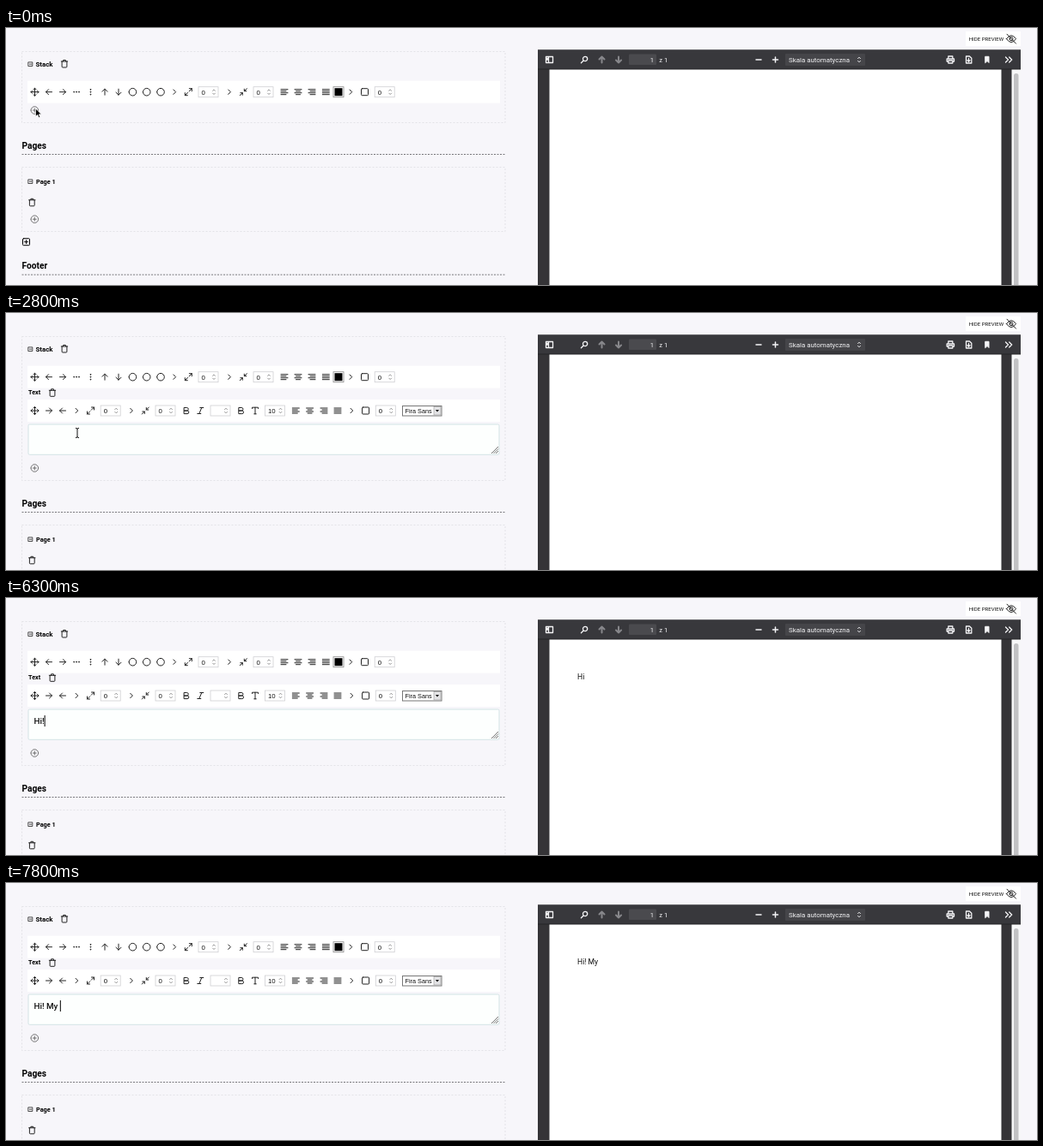
Animation of 1200x300 px, one loop 8 s. Source, as an HTML page:

```html
<!DOCTYPE html>
<html lang="en">
<head>
<meta charset="utf-8">
<title>Document editor with preview</title>
<style>
  html, body { margin: 0; height: 100%; overflow: hidden; background: #f7f6fa; }
  svg { display: block; width: 100vw; height: 100vh; }
  text { font-family: Roboto, "Open Sans", sans-serif; white-space: pre; fill: #111; }
  .bold { font-weight: 700; fill: #000; }
  .arial { font-family: "Liberation Sans", Arial, sans-serif; }
  .icon { fill: none; stroke: #222; stroke-width: 1; stroke-linecap: round; stroke-linejoin: round; }
  .panel { fill: none; stroke: #e3e2e7; stroke-width: 1; stroke-dasharray: 2 2; }
  .rule { stroke: #77767a; stroke-width: 1; stroke-dasharray: 2 1.5; }
  .light { stroke: #f4f4f6; }
  .dim { stroke: #87878b; }
</style>
</head>
<body>
<svg id="stage" viewBox="0 0 1200 300"></svg>
<script>
const LOOP = 8000, STEP = 100;

// Icon outlines, each centred on 0,0
const shapes = {
  move: 'M-4.5 0H4.5M0-4.5V4.5M-1.5-3L0-4.5L1.5-3M-1.5 3L0 4.5L1.5 3M-3-1.5L-4.5 0L-3 1.5M3-1.5L4.5 0L3 1.5',
  left: 'M3.5 0H-3.5M-.5-3L-3.5 0L-.5 3',
  right: 'M-3.5 0H3.5M.5-3L3.5 0L.5 3',
  up: 'M0 3.5V-3.5M-3-.5L0-3.5L3-.5',
  down: 'M0-3.5V3.5M-3 .5L0 3.5L3 .5',
  dotsX: 'M-3.2-.3h.6v.6h-.6zM-.3-.3h.6v.6h-.6zM2.6-.3h.6v.6h-.6z',
  dotsY: 'M-.3-3.2h.6v.6h-.6zM-.3-.3h.6v.6h-.6zM-.3 2.6h.6v.6h-.6z',
  circle: 'M-4.3 0a4.3 4.3 0 1 0 8.6 0a4.3 4.3 0 1 0-8.6 0',
  chevron: 'M-1.3-2.7L1.4 0L-1.3 2.7',
  expand: 'M-4 4L-.8.8M.8-.8L4-4M1-4H4V-1M-4 1V4H-1',
  collapse: 'M-4 4L-1 1M1-1L4-4M-3.5 1H-1V3.5M1-3.5V-1H3.5',
  alignL: 'M-4-3H4M-4-1H2M-4 1H4M-4 3H2',
  alignC: 'M-4-3H4M-2.5-1H2.5M-4 1H4M-2.5 3H2.5',
  alignR: 'M-4-3H4M-2-1H4M-4 1H4M-2 3H4',
  justify: 'M-4-3H4M-4-1H4M-4 1H4M-4 3H4',
  square: 'M-3-4H3Q4-4 4-3V3Q4 4 3 4H-3Q-4 4-4 3V-3Q-4-4-3-4Z',
  bold: 'M-2.5-3.5H.5a1.75 1.75 0 0 1 0 3.5H-2.5ZM-2.5 0H1a1.8 1.8 0 0 1 0 3.6H-2.5Z',
  italic: 'M-.5-3.5H3.5M-3.5 3.5H.5M1.5-3.5L-1.5 3.5',
  type: 'M-3.5-2.5V-3.8H3.5V-2.5M0-3.8V3.8M-1.2 3.8H1.2',
  trash: 'M-3.7-2.7H3.7M-1.4-2.8V-4.2H1.4V-2.8M-2.9-2.7V3.4Q-2.9 4.3-2 4.3H2Q2.9 4.3 2.9 3.4V-2.7',
  plus: 'M-2 0H2M0-2V2',
  minus: 'M-2 0H2',
  toggle: 'M-2.3-2.3H2.3V2.3H-2.3ZM-1.2 0H1.2',
  eyeOff: 'M-5.5 0Q0-8 5.5 0Q0 8-5.5 0ZM-2 0a2 2 0 1 0 4 0a2 2 0 1 0-4 0M-5-5.5L5.5 5.5',
  sidebar: 'M-4-3.5H4V3.5H-4ZM-1-3.5V3.5M-3-1.5H-2M-3 0H-2',
  search: 'M-1.5-1a2.6 2.6 0 1 0 5.2 0a2.6 2.6 0 1 0-5.2 0M-.8 1L-3.6 3.8',
  print: 'M-2.5-1V-4H2.5V-1M-2.5 2H-4.2V-1H4.2V2H2.5M-2.5 1H2.5V4H-2.5Z',
  save: 'M-3-4H1L3.3-1.7V4H-3ZM0-1.5V2M-1.5 .8L0 2.3L1.5 .8',
  bookmark: 'M-2-3.7H2V3.5L0 1.5L-2 3.5Z',
  more: 'M-3.5-3L-.5 0L-3.5 3M.7-3L3.7 0L.7 3',
  spin: 'M-1.4-1.4L0-2.8L1.4-1.4M-1.4 1.4L0 2.8L1.4 1.4'
};

const icon = (name, x, y, style = '') =>
  `<path class="icon" d="${shapes[name]}" transform="translate(${x} ${y})" style="${style}"/>`;
const lightIcon = (name, x, cls = 'light', style = 'stroke-width:1.3') =>
  `<path class="icon ${cls}" d="${shapes[name]}" transform="translate(${x} 37)" style="${style}"/>`;
const label = (str, x, y, size, attrs = '') =>
  `<text x="${x}" y="${y}" font-size="${size}" ${attrs}>${str}</text>`;
const box = (x, y, w, h, fill, attrs = '') =>
  `<rect x="${x}" y="${y}" width="${w}" height="${h}" fill="${fill}" ${attrs}/>`;
const field = (x, y, value) =>
  box(x + .5, y - 6, 23, 12, '#fff', 'stroke="#cfcfd3" stroke-width=".8"') +
  label(value, x + 4, y + 2.8, 7.8, 'class="arial"') +
  icon('spin', x + 18.5, y, 'stroke:#777;stroke-width:.8');
const ringed = (name, x, y, id = '') =>
  `<g ${id}>${icon('circle', x, y, 'stroke:#555;stroke-width:.8')}${icon(name, x, y, 'stroke:#555;stroke-width:.8')}</g>`;
const rule = y => `<path class="rule" d="M18.5 ${y}H581"/>`;
// A row of [icon name, x] or [number field value, x, true]
const toolbar = (y, items) => box(25, y - 13, 550, 26, '#fff') +
  items.map(([name, x, isField]) => isField ? field(x, y, name) : icon(name, x, y)).join('');
const button = (str, x, y, w, attrs = '') =>
  `<g ${attrs}>${box(x + .5, y + .5, w - 1, 15, '#fff', 'rx="1.2" stroke="#111"')}` +
  label(str, x + w / 2, y + 10.2, 6.5, 'text-anchor="middle" font-weight="500"') + '</g>';

const stackBar = toolbar(74.7, [
  ['move', 33.5], ['left', 50], ['right', 66], ['dotsX', 82.3], ['dotsY', 98.7], ['up', 115], ['down', 131],
  ['circle', 147.4], ['circle', 163.7], ['circle', 180], ['chevron', 196.2], ['expand', 212.3], ['0', 223.5, true],
  ['chevron', 260], ['collapse', 276.3], ['0', 287.5, true], ['alignL', 324], ['alignC', 340], ['alignR', 356],
  ['justify', 372.3], ['chevron', 401.3], ['square', 417.5], ['0', 428.7, true]
]) + box(381, 68.7, 12, 12, '#fff', 'stroke="#888" stroke-width=".8"') + box(382.5, 70.2, 9, 9, '#000');

const textBar = toolbar(114, [
  ['move', 33.5], ['right', 50], ['left', 66], ['chevron', 82.3], ['expand', 98.5], ['0', 109.7, true],
  ['chevron', 146], ['collapse', 162.3], ['0', 173.5, true], ['bold', 210], ['italic', 226.3], ['', 237.5, true],
  ['bold', 273.7], ['type', 290], ['10', 301, true], ['alignL', 337.3], ['alignC', 353.6], ['alignR', 370],
  ['justify', 386], ['chevron', 402.3], ['square', 418.6], ['0', 429.8, true]
]) + box(461.5, 108.5, 45.5, 11.5, '#fff', 'stroke="#777"') + label('Fira Sans', 464.5, 116.8, 7.3, 'class="arial"') +
  box(498, 109.5, 8, 9.5, '#e4e4e6', 'stroke="#999" stroke-width=".6"') + '<path d="M500 113h4l-2 2.5z"/>';

stage.innerHTML = `
<defs><filter id="shadow" x="-20%" y="-40%" width="140%" height="190%">
  <feDropShadow dx="0" dy="2" stdDeviation="4" flood-color="#000" flood-opacity=".6"/></filter></defs>
${box(0, 0, 1200, 300, '#f7f6fa')}
<rect id="stackPanel" class="panel" x="18.5" y="27.5" width="562.5"/>
${icon('toggle', 28.5, 42.2, 'stroke-width:.8')}${label('Stack', 34.5, 45, 7.9, 'class="bold"')}${icon('trash', 68, 41.7)}
${stackBar}
<g id="textBlock">
  ${label('Text', 26, 95.4, 7.2, 'class="bold"')}${icon('trash', 54, 93)}${textBar}
  ${box(26, 130, 548, 35.3, '#fdfffe', 'rx="1.5" stroke="#d3e3e5"')}
  <path d="M565 164L573 156M567.5 164L573 158.5M570 164L573 161" stroke="#555" stroke-width=".8"/>
  <text id="typed" x="32.5" y="146.6" font-size="9.8" font-weight="500"></text>
  <path id="caret" d="M0 137V150" stroke="#000" stroke-width="1"/>
</g>
${ringed('plus', 33.3, 96, 'id="addButton"')}
${ringed('minus', 33.3, 96, 'id="closeButton"')}
<g id="below">
  ${label('Pages', 18.5, 141, 10.2, 'class="bold"')}${rule(147.5)}
  <rect class="panel" x="18.5" y="162.5" width="562.5" height="75"/>
  ${icon('toggle', 28.5, 179.2, 'stroke-width:.8')}${label('Page 1', 35, 182, 7.3, 'class="bold"')}
  ${icon('trash', 30.3, 203.5)}${ringed('plus', 33.3, 223.2)}
  ${icon('square', 23.5, 249.7, 'stroke:#000')}${icon('plus', 23.5, 249.7, 'stroke:#000')}
  ${label('Footer', 18.5, 281.3, 10.2, 'class="bold"')}${rule(288)}
</g>
${box(1117, 4, 64, 17, '#fff')}${label('HIDE PREVIEW', 1120.7, 15, 6.1)}${icon('eyeOff', 1170, 12.7)}
${box(619, 25.5, 562, 275, '#353437')}
<g id="sheet">
  ${box(632.5, 47, 526, 253, '#fff')}${box(1170.5, 48, 10.5, 252, '#f7f7f8')}${box(1173, 53, 5.5, 260, '#c1c1c3', 'rx="2.7"')}
  <text id="preview" x="665" y="94.7" font-size="8.6"></text>
</g>
${box(619, 25.5, 562, 22.5, '#38383c')}<path d="M619 48H1181" stroke="#242427"/>
${lightIcon('sidebar', 632.5)}${lightIcon('search', 673)}
${lightIcon('up', 693.5, 'dim', 'stroke-width:2')}${lightIcon('down', 713, 'dim', 'stroke-width:2')}
${box(725, 30.5, 32, 12.5, '#4a4a4e', 'rx="1"')}
<text id="pageNumber" x="754" y="39.7" font-size="7.6" text-anchor="end" style="fill:#f4f4f6"></text>
<text id="pageCount" x="760.3" y="39.7" font-size="7.6" style="fill:#f4f4f6"></text>
<g transform="translate(876 37) scale(1.5) translate(-876 -37)">${lightIcon('minus', 876, 'light', '')}</g>
<g transform="translate(895.5 37) scale(1.5) translate(-895.5 -37)">${lightIcon('plus', 895.5, 'light', '')}</g>
${box(907, 30, 93, 14, '#454549', 'rx="1"')}${label('Skala automatyczna', 911, 39.6, 7.9, 'style="fill:#f4f4f6"')}
${lightIcon('spin', 993, 'light', 'stroke-width:1')}
${lightIcon('print', 1099.3)}${lightIcon('save', 1120.5)}
<g id="mark">${lightIcon('bookmark', 1142, 'light', 'fill:#f4f4f6')}</g>${lightIcon('more', 1167)}
<g id="popup">
  ${box(68, 88, 188, 65, '#fff', 'rx="2" filter="url(#shadow)"')}
  ${button('Text', 80.5, 100.5, 28.5, 'id="textButton"')}${button('Image', 111.5, 100.5, 33.5)}
  ${button('Stack', 148, 100.5, 32)}${button('List', 183, 100.5, 26.5)}
  ${button('Vertical split', 80.5, 120, 52)}${button('Table', 135.5, 120, 31.5)}${button('Time stamp', 169.5, 120, 50.5)}
</g>
<g id="cursor" stroke-linejoin="round">
  <path id="arrow" d="M0 0V9.3L2.2 7.3L3.7 10.6L5.2 9.9L3.8 6.8H6.7Z" stroke="#fff" stroke-width=".7"/>
  <path id="hand" d="M-1 1Q0-.6 1 1V4Q2 3.2 3 4.3Q4 3.7 4.8 4.8Q6.3 4.4 6.3 6V8Q6 9.5 5.2 11H0Q-1-.0 -3.5 6.3Q-3.6 5-1 6.4Z" fill="#fff" stroke="#000" stroke-width=".9"/>
  <path id="beam" d="M-2-5.7Q0-5.7 0-4.2Q0-5.7 2-5.7M0-4.2V4.2M-2 5.7Q0 5.7 0 4.2Q0 5.7 2 5.7" fill="none" stroke="#111"/>
</g>`;

const $ = id => document.getElementById(id);
const show = (id, on) => $(id).setAttribute('visibility', on ? 'inherit' : 'hidden');
const shift = (id, x, y) => $(id).setAttribute('transform', `translate(${x} ${y})`);
const within = (t, ranges) => ranges.some(([from, to]) => t >= from && t < to);
// Last value whose start time has passed
const latest = (t, list) => list.filter(([start]) => t >= start).pop()[1];
const ease = p => p * p * (3 - 2 * p);

const path = [[100, 34.5, 94], [500, 33.5, 94.5], [1000, 33.5, 94.5], [1700, 92, 112], [1800, 94, 111], [2000, 101, 107.5],
  [2400, 101, 107.5], [2800, 83, 140], [3400, 83, 140], [3600, 188, 143.5]];
const typing = [[0, ''], [5100, 'H'], [5200, 'Hi'], [6300, 'Hi!'], [6700, 'Hi! '], [7000, 'Hi! M'], [7400, 'Hi! My'], [7600, 'Hi! My ']];
const rendered = [[0, ''], [5500, 'Hi'], [6800, 'Hi!'], [7800, 'Hi! My']];
const reloads = [[2500, 2800], [5300, 5500], [6500, 6800], [7000, 7100], [7300, 7800]];
const caretOn = [[3500, 3600], [4100, 4600], [5100, 5800], [6300, LOOP]];

function cursorAt(t) {
  const next = path.findIndex(([time]) => time > t);
  if (next === 0) return path[0].slice(1);
  if (next < 0) return path[path.length - 1].slice(1);
  const [t0, x0, y0] = path[next - 1], [t1, x1, y1] = path[next];
  const p = ease((t - t0) / (t1 - t0));
  return [x0 + (x1 - x0) * p, y0 + (y1 - y0) * p];
}

function draw(t) {
  const open = t >= 900 && t < 2200, added = t >= 2200;
  const offset = added ? 85 : open ? 45.5 : 0;
  $('stackPanel').setAttribute('height', 83 + offset);
  shift('below', 0, offset);
  shift('addButton', 0, added ? 85 : 0);
  show('addButton', !open);
  show('closeButton', open);
  show('textBlock', added);

  const entry = ease(Math.min(1, Math.max(0, (t - 800) / 300)));
  show('popup', open);
  shift('popup', 0, -30 * (1 - entry));
  $('popup').setAttribute('opacity', entry);

  const [x, y] = cursorAt(t);
  const hover = open && x > 81 && x < 109 && y > 101 && y < 117;
  $('textButton').querySelector('rect').setAttribute('fill', hover ? '#06103a' : '#fff');
  $('textButton').querySelector('text').style.fill = hover ? '#fff' : '#111';
  const kind = t >= 200 && t < 2200 ? 'hand' : t >= 2700 && t < 3600 ? 'beam' : 'arrow';
  ['arrow', 'hand', 'beam'].forEach(name => show(name, name === kind));
  show('cursor', t < 4800);
  shift('cursor', x, y);

  $('typed').textContent = latest(t, typing);
  shift('caret', 33 + $('typed').getComputedTextLength(), 0);
  show('caret', within(t, caretOn));

  const loading = within(t, reloads);
  show('sheet', !loading);
  $('preview').textContent = latest(t, rendered);
  $('pageNumber').textContent = loading ? '0' : '1';
  $('pageCount').textContent = loading ? 'z 0' : 'z 1';
  $('mark').setAttribute('opacity', loading ? .4 : 1);
}

const start = performance.now();
function frame() {
  const t = (performance.now() - start) % LOOP;
  draw(Math.floor(t / STEP) * STEP);
  requestAnimationFrame(frame);
}
frame();
</script>
</body>
</html>
```
